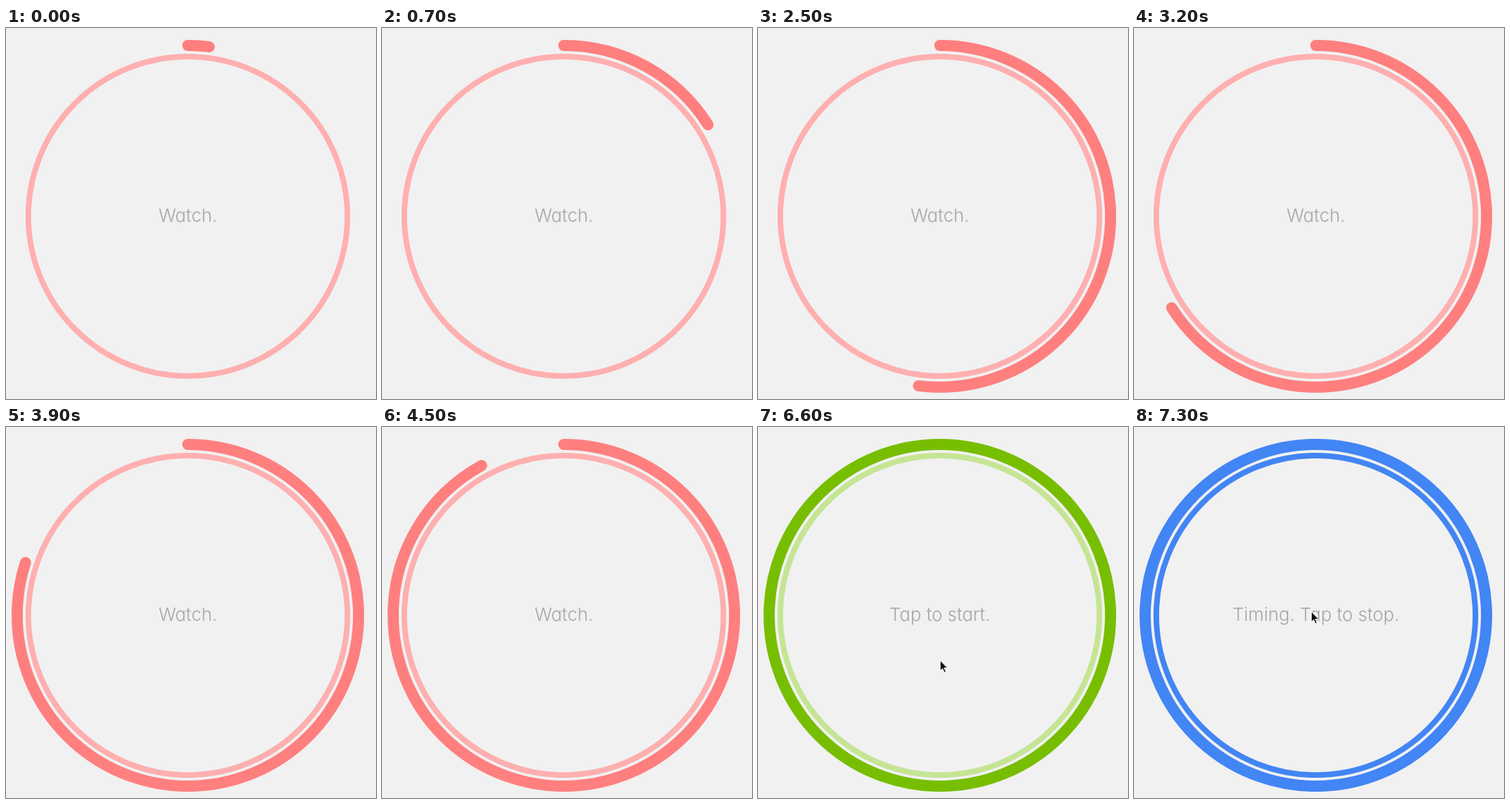
Animation of 531 by 532 pixels, one loop 8000 ms. Source, as an HTML page:

```html
<!DOCTYPE html>
<html lang="en">
<head>
<meta charset="utf-8">
<title>Reaction timer</title>
<style>
  html, body { margin: 0; width: 100%; height: 100%; overflow: hidden; background: #f1f1f1; }
  svg { display: block; width: 531px; height: 532px; }
  circle { fill: none; }
  text {
    font: 300 26px Inter, Lato, sans-serif;
    font-feature-settings: "cv11";
    text-anchor: middle;
    fill: #a6a6a6;
  }
</style>
</head>
<body>
<svg viewBox="0 0 531 532">
  <circle id="ring" cx="261" cy="270" r="229" stroke-width="8"/>
  <circle id="arc" cx="261" cy="270" r="245" stroke-width="16" stroke-linecap="round"
          pathLength="360" transform="rotate(-90 261 270)"/>
  <text id="label" x="261" y="278"></text>
  <path id="cursor" d="M.5 .8V15.6L3.9 12.4L6.3 18L8.7 17L6.3 11.5H11Z"
        fill="#111" stroke="#fff" stroke-width="1" stroke-linejoin="round"/>
</svg>
<script>
const LOOP = 8000, STEP = 100;
const READY = 5300, ENTER = 6000, TAPPED = 7300;
const DEG_PER_STEP = 7.2;

const states = {
  watch:  { text: 'Watch.', arc: '#ff7f7f', ring: '#ffafaf' },
  ready:  { text: 'Tap to start.', arc: '#77be00', ring: '#c5e594' },
  timing: { text: 'Timing. Tap to stop.', arc: '#4285f4', ring: '#4285f4' }
};

const [ring, arc, label, cursor] =
  ['ring', 'arc', 'label', 'cursor'].map(id => document.getElementById(id));

const clamp = v => Math.max(0, Math.min(1, v));
const mix = (a, b, k) => a + (b - a) * k;
const smooth = k => k * k * (3 - 2 * k);

// Pointer comes in from below, pauses briefly, then glides to the middle.
function pointerAt(t) {
  if (t < 6300) {
    const k = clamp((t - ENTER) / 200);
    return [mix(286, 268, k), mix(469, 404, k)];
  }
  const k = smooth(clamp((t - 6300) / 600));
  return [mix(268, 254, k), mix(404, 264, k)];
}

function draw(time) {
  const step = Math.floor(time / STEP);
  const t = step * STEP;
  const state = t < READY ? states.watch : t < TAPPED ? states.ready : states.timing;
  const angle = Math.min(360, DEG_PER_STEP * (step + 1));

  ring.setAttribute('stroke', state.ring);
  arc.setAttribute('stroke', state.arc);
  arc.setAttribute('stroke-dasharray', angle < 360 ? `${angle} 720` : 'none');
  if (label.textContent !== state.text) label.textContent = state.text;

  const [x, y] = pointerAt(t).map(Math.round);
  cursor.setAttribute('visibility', t < ENTER ? 'hidden' : 'visible');
  cursor.setAttribute('transform', `translate(${x} ${y})`);
}

const start = performance.now();
function tick() {
  draw((performance.now() - start) % LOOP);
  requestAnimationFrame(tick);
}
draw(0);
requestAnimationFrame(tick);
</script>
</body>
</html>
```
